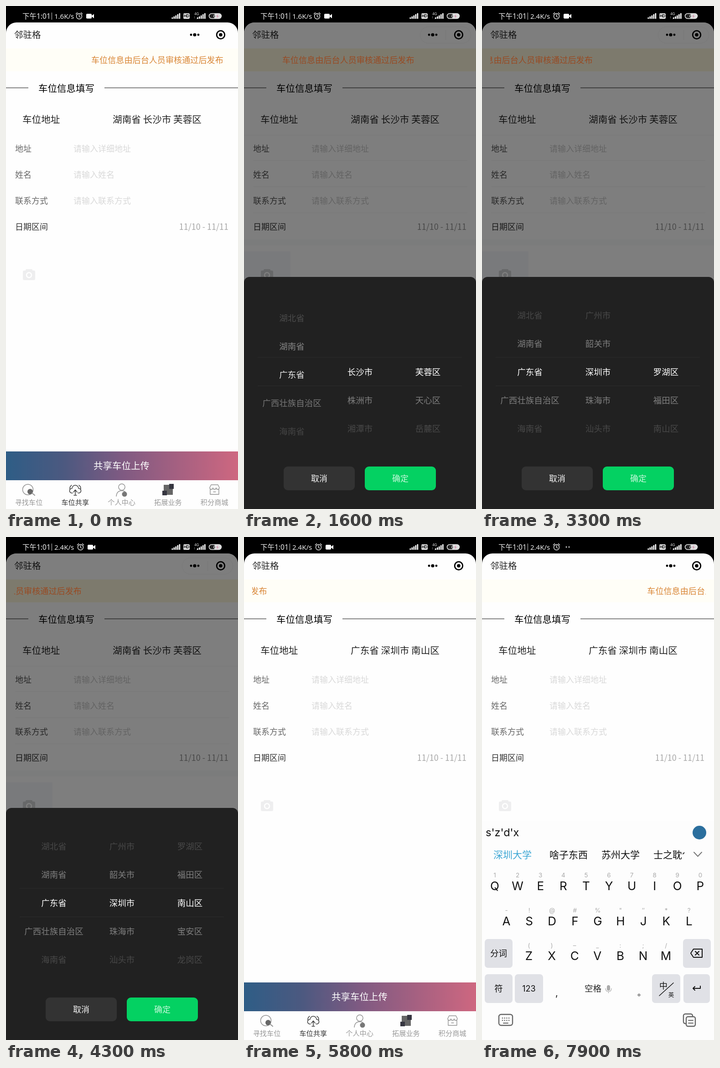
An HTML page with a canvas that plays this animation: 509 by 1101 pixels, repeating every 8 s.

```html
<!DOCTYPE html>
<html lang="zh-CN">
<head>
<meta charset="utf-8">
<style>
html, body { margin: 0; width: 100%; height: 100%; overflow: hidden; background: #fff; }
canvas { display: block; width: 509px; height: 1101px; }
</style>
</head>
<body>
<canvas id="stage" width="509" height="1101"></canvas>
<script>
const W = 509, H = 1101, LOOP = 8000;
const g = document.getElementById('stage').getContext('2d');
const CJK = '"Noto Sans CJK SC", "Noto Sans CJK", "Noto Sans", sans-serif';
const LATIN = 'Inter, "Noto Sans CJK SC", sans-serif';
const NOTO = '"Noto Sans", sans-serif';

const clamp = v => Math.max(0, Math.min(1, v));
const span = (t, a, b) => clamp((t - a) / (b - a));
const smooth = p => p * p * (3 - 2 * p);
const easeOut = p => 1 - (1 - p) ** 3;
const mix = (a, b, p) => `rgb(${a.map((v, i) => Math.round(v + (b[i] - v) * p))})`;

// y is the vertical middle of the glyphs
function text(s, x, y, size, color, align = 'left', font = CJK, weight = 400) {
  g.font = `${weight} ${size}px ${font}`;
  g.textAlign = align;
  g.fillStyle = color;
  g.fillText(s, x, y + size * 0.38);
}
function box(x, y, w, h, r, fill, stroke, lw = 1) {
  g.beginPath();
  g.roundRect(x, y, w, h, r);
  if (fill) { g.fillStyle = fill; g.fill(); }
  if (stroke) { g.strokeStyle = stroke; g.lineWidth = lw; g.stroke(); }
}
function disc(x, y, r, fill, stroke, lw = 1) {
  g.beginPath();
  g.arc(x, y, r, 0, Math.PI * 2);
  if (fill) { g.fillStyle = fill; g.fill(); }
  if (stroke) { g.strokeStyle = stroke; g.lineWidth = lw; g.stroke(); }
}
function path(d, color, lw = 1.5, x = 0, y = 0) {
  g.save();
  g.translate(x, y);
  g.strokeStyle = color;
  g.lineWidth = lw;
  g.lineCap = g.lineJoin = 'round';
  g.stroke(new Path2D(d));
  g.restore();
}
function clipped(x, y, w, h, r, draw) {
  g.save();
  g.beginPath();
  g.roundRect(x, y, w, h, r);
  g.clip();
  draw();
  g.restore();
}

function signal(x) {
  for (let i = 0; i < 5; i++) box(x + i * 4, 25 - i * 2.3, 2.7, 3 + i * 2.3, 0.5, '#fff');
}
function statusBar(t) {
  const shift = t < 3000 ? 0 : 3;
  g.fillStyle = '#000';
  g.fillRect(0, 0, W, 70);
  text('下午', 36, 22, 15.5, '#eee');
  text('1:01', 67, 22, 15.5, '#eee', 'left', NOTO);
  text('|', 100.5, 21, 14, '#eee', 'center');
  text(shift ? '2.4K/s' : '1.6K/s', 106, 22, 15, '#eee', 'left', NOTO);
  path('M0 -3.5V.5L2.5 2M-7 -5L-4 -8M7 -5L4 -8', '#eee', 1.4, 160.5 + shift, 22.5);
  disc(160.5 + shift, 22.5, 6, null, '#eee', 1.4);
  if (t < 6500) {
    const x = 176 + shift;
    box(x, 17, 12, 10.5, 2, '#fff');
    g.beginPath();
    g.moveTo(x + 11, 22);
    g.lineTo(x + 17, 17.5);
    g.lineTo(x + 17, 27);
    g.fill();
  } else {
    disc(185, 22, 1.4, '#ddd');
    disc(191, 22, 1.4, '#ddd');
  }
  signal(363.5);
  box(389, 16, 14, 12, 2.5, '#eee');
  text('HD', 396, 22, 8.5, '#000', 'center', LATIN, 700);
  text('4G', 413, 17, 7.5, '#eee', 'left', LATIN);
  text('↑↓', 411, 25.5, 5.5, '#aaa');
  signal(419);
  box(445.5, 16.5, 27, 11, 5.5, '#222', '#eee', 1.5);
  box(455, 16.5, 17, 11, 5, '#ddd');
  text('5', 456, 22, 9, '#222', 'center', LATIN, 700);
  path('M1 -3L-2 .5H2L-1 3.5', '#c79', 1, 464, 22);
}

function camera(color) {
  box(37, 579, 27, 21, 3, color);
  box(43, 576, 15, 7, 2, color);
  disc(50.5, 589, 5.5, null, '#fff', 2.6);
}

const corners = [23, 23, 0, 0];
const fields = [['地址', '请输入详细地址', 312], ['姓名', '请输入姓名', 369], ['联系方式', '请输入联系方式', 426]];
function page(t, dim) {
  const faint = clamp(dim / 0.12);
  box(0, 36, W, H, corners, '#fefefe');
  text('邻驻格', 18, 63, 19.5, '#222');
  disc(406, 63, 2.4, '#000');
  disc(414, 63, 3.6, '#000');
  disc(422, 63, 2.4, '#000');
  disc(471, 63, 8.8, null, '#000', 2.8);
  disc(471, 63, 3.8, '#000');

  g.fillStyle = mix([255, 254, 247], [252, 245, 220], faint);
  g.fillRect(0, 93, W, 50);

  g.fillStyle = '#444';
  g.fillRect(0, 178.5, 49, 1.3);
  g.fillRect(216, 178.5, 293, 1.3);
  text('车位信息填写', 71, 180, 20.5, '#000');
  text('车位地址', 36, 248.5, 20.6, '#222');
  text(t < 4900 ? '湖南省 长沙市 芙蓉区' : '广东省 深圳市 南山区', 234, 248.5, 20.65, '#222');
  const labelColor = mix([104, 104, 104], [80, 80, 80], faint);
  const hintColor = mix([217, 217, 217], [198, 198, 198], faint);
  for (const [label, hint, y] of fields) {
    text(label, 20, y, 18, labelColor);
    text(hint, 148, y, 18, hintColor);
  }
  text('日期区间', 20, 483, 18, '#333');
  text('11/10 - 11/11', 488, 483, 18, mix([168, 168, 168], [145, 145, 145], faint), 'right');

  camera('#eeeeef');
  if (faint) {
    g.save();
    g.globalAlpha = faint;
    box(386.5, 45.5, 111, 36, 18, null, '#f2f2f2');
    path('M442.5 53V74', '#f0f0f0', 1);
    g.fillStyle = '#f7f9f9';
    g.fillRect(0, 511, W, 13);
    g.fillStyle = '#f2f2f2';
    g.fillRect(0, 282, W, 1);
    for (const y of [338, 395, 452]) g.fillRect(20, y, 470, 1);
    g.fillStyle = '#f4f6fa';
    g.fillRect(0, 537, 102, 103);
    camera('#cfd1d3');
    g.restore();
  }
  uploadBar();
  tabs();
}

function uploadBar() {
  const grad = g.createLinearGradient(0, 0, W, 0);
  grad.addColorStop(0, '#2e5d86');
  grad.addColorStop(0.25, '#4c5980');
  grad.addColorStop(0.5, '#7f5a82');
  grad.addColorStop(1, '#ce6780');
  g.fillStyle = grad;
  g.fillRect(0, 975, W, 63);
  text('共享车位上传', 253.5, 1006, 20.5, '#fff', 'center');
}

function tabs() {
  const grey = '#929292';
  ['寻找车位', '车位共享', '个人中心', '拓展业务', '积分商城'].forEach((s, i) =>
    text(s, 50 + i * 101.8, 1086.5, 15.2, i === 1 ? '#333' : '#999', 'center'));
  disc(48, 1058.5, 11.5, null, grey, 1.5);
  disc(53, 1063, 6, '#666');
  path('M57 1066L63 1071', grey, 2);
  path('M-6 7H-8A5 5 0 0 1 -7 -3A7 7 0 0 1 7 -3A5 5 0 0 1 8 7H6M0 12V1M-4 5L0 0L4 5M-3 12H3M-12 -2Q-12 -8 -8 -10M12 -2Q12 -8 8 -10', '#444', 1.6, 152, 1059);
  disc(254, 1053, 7, null, grey, 1.5);
  path('M242 1073Q243 1061 254 1061Q260 1061 263 1065', grey, 1.5);
  disc(260, 1068.5, 5.5, '#777');
  g.fillStyle = '#666';
  g.fillRect(346, 1048, 20, 22);
  g.fillStyle = '#363640';
  g.fillRect(358, 1046, 10, 11);
  g.fillRect(343, 1061, 10, 10);
  path('M450 1048H465L468 1054Q468 1058 464.5 1058Q461 1058 461 1054.5Q461 1058 457.5 1058Q454 1058 454 1054.5Q454 1058 450.5 1058Q447 1058 447 1054ZM448 1058V1069H467V1058M455 1063.5H460', grey, 1.4);
}

// constant-speed marquee that stalls while the sheet opens
function notice(t, dim) {
  const speed = 0.0769, width = 290, left = 18, right = 491;
  let x = t < 400 ? 187 - speed * Math.min(t, 110) : 206.8 - speed * t;
  if (x < left - width) x += right - left + width;
  clipped(left, 93, right - left, 50, 0, () =>
    text('车位信息由后台人员审核通过后发布', x, 118, 18.12, mix([217, 134, 54], [152, 74, 34], dim * 2)));
}

const provinces = ['河南省', '湖北省', '湖南省', '广东省', '广西壮族自治区', '海南省'];
const hunan = ['长沙市', '株洲市', '湘潭市'];
const guangdong = ['广州市', '韶关市', '深圳市', '珠海市', '汕头市'];
const changsha = ['芙蓉区', '天心区', '岳麓区'];
const guangzhou = ['荔湾区', '越秀区', '海珠区'];
const shenzhen = ['罗湖区', '福田区', '南山区', '宝安区', '龙岗区'];

function wheel(items, index, cx, fade) {
  items.forEach((s, i) => {
    const d = Math.abs(i - index);
    if (d < 2.6) text(s, cx, 801 + (i - index) * 62, 18.5, `rgba(255,255,255,${fade ** d})`, 'center');
  });
}
function sheet(t, shift, closing) {
  const moved = t >= 1900, fade = 0.42 * (1 - closing);
  g.save();
  g.translate(0, shift);
  g.globalAlpha = (1 - closing) ** 2;
  box(0, 593, W, 540, [12, 12, 0, 0], '#212121');
  g.fillStyle = '#2d2d2d';
  g.fillRect(30, 768.5, 448, 1);
  g.fillRect(30, 831, 448, 1);
  box(87, 1008, 156, 52, 9, '#333');
  box(265, 1008, 156, 52, 9, '#04d162');
  g.globalAlpha = 1;
  wheel(provinces, 2 + smooth(span(t, 1200, 1700)), 105, fade);
  wheel(moved ? guangdong : hunan, 2 * smooth(span(t, 2700, 3200)), 254.5, fade);
  wheel(t >= 3300 ? shenzhen : moved ? guangzhou : changsha, 2 * smooth(span(t, 3500, 4100)), 403.5, fade);
  text('取消', 165, 1034, 18, '#f2f2f2', 'center');
  text('确定', 343, 1034, 18, '#c5f8da', 'center');
  g.restore();
}

function keyRow(keys, marks, x, y) {
  [...keys].forEach((k, i) => {
    text(marks[i], x + i * 50.1, y - 23, 13.5, '#aaa', 'center', LATIN);
    text(k, x + i * 50.1, y, 26, '#111', 'center', LATIN);
  });
}
function greyKey(x, y, w, label) {
  box(x, y, w, 63, 7, '#e0e1e6');
  if (label) text(label, x + w / 2, y + 31, 18.5, '#111', 'center');
}

const typed = [
  [7000, 's', ['是', '上', '说', '时', '谁', '水']],
  [7300, "s'z", ['深圳', '孙子', '数字', '十字']],
  [7550, "s'z'd", ['深圳的', '十字的', '山寨的', '手中的']],
  [7800, "s'z'd'x", ['深圳大学', '啥子东西', '苏州大学', '士之耽兮']]
];
function composing(t) {
  const state = typed.filter(s => t >= s[0]).pop();
  if (!state) return;
  g.fillStyle = '#fdfdfd';
  g.fillRect(0, 622, W, 50);
  text(state[1], 8, 646, 23.5, '#111', 'left', LATIN);
  disc(477, 647, 15, '#2b6f9e');
  clipped(0, 672, 444, 46, 0, () => {
    let x = 25;
    state[2].forEach((s, i) => {
      text(s, x, 695, 21, i ? '#111' : '#3ba6d4', 'left', CJK, 500);
      x += s.length * 21 + (i ? 30 : 39);
    });
  });
}
function keyboard(t, shift) {
  g.save();
  g.translate(0, shift);
  g.fillStyle = '#fdfdfd';
  g.fillRect(0, 672, W, H);
  path('M465 690L473.5 699L482 690', '#777', 2);
  keyRow('QWERTYUIOP', '1234567890', 28, 763);
  keyRow('ASDFGHJKL', '-!@#%"″*?', 53.5, 840);
  keyRow('ZXCVBNM', '()–_:;/', 103, 916.5);

  greyKey(6, 880, 61, '分词');
  greyKey(441, 880, 61);
  path('M464 902H483V920H464L458 911ZM468 907L476 915M476 907L468 915', '#111', 2);
  greyKey(6, 957, 61, '符');
  greyKey(72, 957, 62);
  text('123', 103, 988, 18, '#111', 'center', LATIN);
  text(',', 164, 997, 20, '#111', 'center', LATIN);
  text('空格', 225, 988, 18.5, '#222');
  box(274, 981, 7, 12, 3.5, '#aaa');
  path('M271 988Q271 995 277.5 995Q284 995 284 988M277.5 995V998', '#aaa', 1.2);
  text('。', 341, 997, 18, '#111');
  greyKey(373, 957, 62);
  text('中', 398, 982, 18, '#111', 'center');
  text('英', 415, 1002, 12.5, '#111', 'center');
  path('M389 1004L420 976', '#111', 1.5);
  greyKey(442, 957, 58);
  path('M479 983V988H463M467 984L463 988L467 992', '#111', 2);

  box(37, 1045, 30, 24, 5, null, '#666', 2.4);
  for (let i = 0; i < 8; i++) disc(45 + (i % 4) * 4.7, 1053 + Math.floor(i / 4) * 5, 1.3, '#666');
  path('M47 1064H57', '#666', 2);
  box(442, 1044, 20, 21, 4, null, '#666', 2.4);
  box(448, 1050, 20, 21, 4, '#fdfdfd', '#666', 2.4);
  path('M453 1058H463M453 1064H463', '#666', 2);
  composing(t);
  g.restore();
}

function draw(t) {
  const opening = easeOut(span(t, 200, 600));
  const closing = span(t, 5000, 5350);
  const dim = 0.5 * opening * (1 - closing) ** 1.65;
  statusBar(t);
  page(t, dim);
  if (dim > 0) box(0, 36, W, H, corners, `rgba(0,0,0,${dim})`);
  notice(t, dim);
  if (dim > 0) sheet(t, closing ? closing * 483 : (1 - opening) * 508, closing);
  if (t >= 6100) keyboard(t, (1 - easeOut(span(t, 6050, 6400))) * 429);
}

function tick() {
  const t = Math.floor((performance.now() % LOOP) / 100) * 100;
  g.clearRect(0, 0, W, H);
  draw(t);
  requestAnimationFrame(tick);
}
tick();
</script>
</body>
</html>
```
